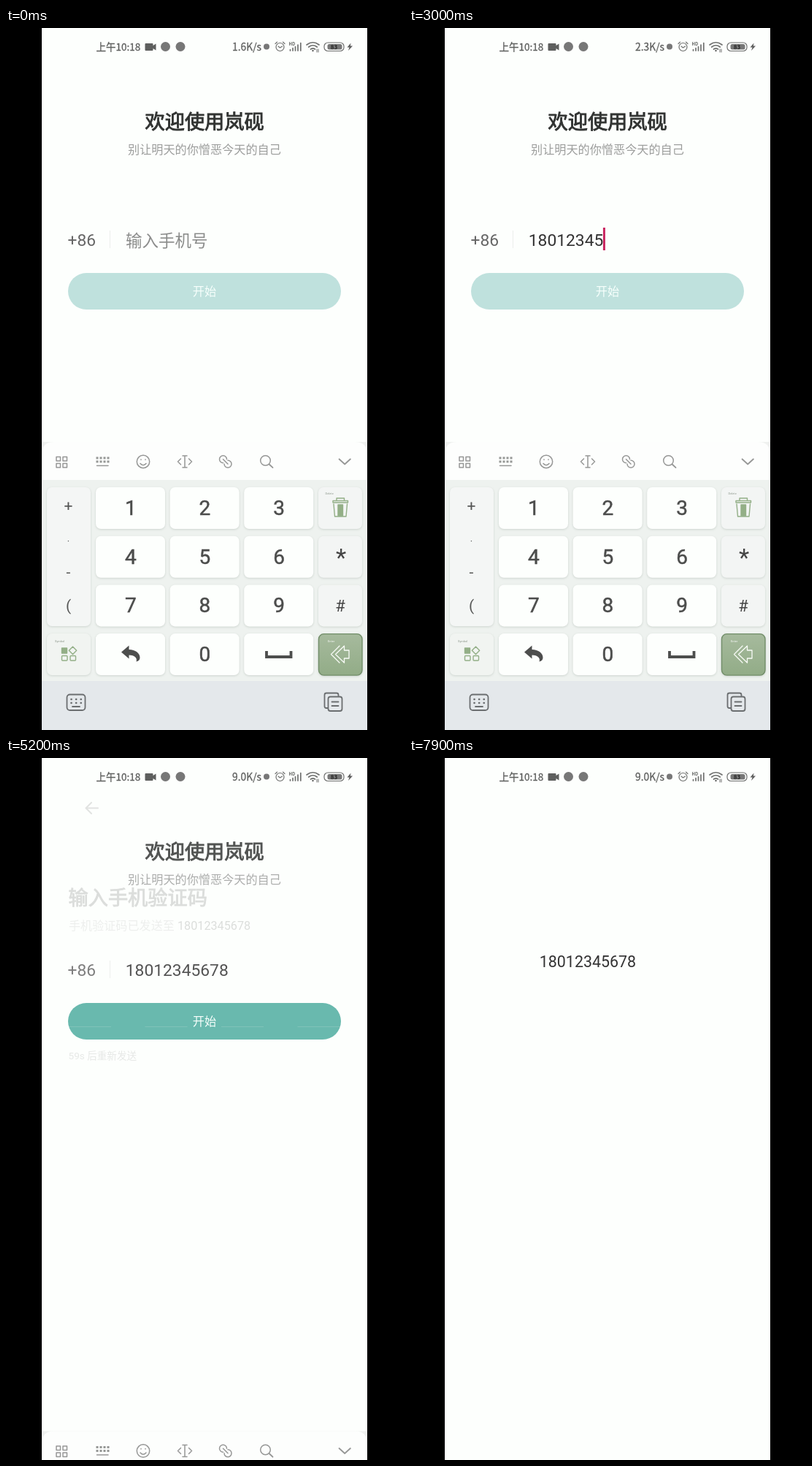
An HTML page for the animation above (8000 ms loop, 544 by 960 pixels).

```html
<!DOCTYPE html>
<html lang="zh-CN">
<head>
<meta charset="utf-8">
<title>Phone sign-in</title>
<style>
html, body { margin: 0; width: 100%; height: 100%; overflow: hidden; background: #000; }
svg { display: block; width: 544px; height: 960px; }
text { font-family: "Noto Sans CJK SC", "Noto Sans CJK", "Noto Sans", sans-serif; white-space: pre; }
.num { font-family: Roboto, "Noto Sans CJK SC", sans-serif; }
.bold { fill: #303231; stroke: #303231; stroke-width: .9; }
.semi { stroke: #5e5f5e; stroke-width: .3; }
.cap { fill: #4c4d4c; stroke: #4c4d4c; stroke-width: .5; }
.mid { text-anchor: middle; }
.line { fill: none; stroke-linecap: round; stroke-linejoin: round; }
.tiny { font: 4px Roboto, sans-serif; }
#keys rect { filter: drop-shadow(0 1.5px 1.5px rgba(90, 110, 95, .22)); }
</style>
</head>
<body>
<svg viewBox="0 0 544 960">
  <defs>
    <clipPath id="screen"><rect x="49" width="446" height="960"/></clipPath>
    <linearGradient id="enter" x1="0" y1="0" x2="0" y2="1">
      <stop offset="0" stop-color="#a6ba9d"/><stop offset="1" stop-color="#92ac87"/>
    </linearGradient>
  </defs>
  <rect width="544" height="960"/>
  <g clip-path="url(#screen)">
    <rect x="49" width="446" height="960" fill="#fdfffd"/>

    <g id="login">
      <text class="bold" x="190.5" y="138" font-size="27.2">欢迎使用岚砚</text>
      <text x="167" y="172" font-size="16.15" fill="#9c9d9c">别让明天的你憎恶今天的自己</text>
      <text class="num" x="84.5" y="298" font-size="22.8" fill="#666">+86</text>
      <path d="M142.5 277v24" stroke="#eceeec"/>
      <text id="hint" x="164" y="298.5" font-size="22.5" fill="#8b8c8b">输入手机号</text>
      <text id="phone" class="num" x="163.8" y="298" font-size="22.8" fill="#333"></text>
      <rect id="caret" y="273" width="3" height="31" fill="#c9245f"/>
      <rect id="button" x="85" y="335" width="374" height="50" rx="25"/>
      <text class="mid" x="272" y="366.3" font-size="16.2" fill="#f7fffc">开始</text>
    </g>

    <g id="verify">
      <path class="line" d="M126 68.500H110M117 61l-7.500 7.500 7.500 7.500" stroke="#555" stroke-width="2"/>
      <text class="bold" x="85.5" y="201" font-size="27.2">输入手机验证码</text>
      <text x="86" y="235" font-size="16.1" fill="#9c9d9c">手机验证码已发送至</text>
      <text class="num full" x="235" y="235" font-size="16.2" fill="#333"></text>
      <path d="M86 367.500h58M190.500 367.500h58M295 367.500h58M399.500 367.500h59" stroke="#f1f3f1"/>
      <rect id="codeCaret" x="114" y="326" width="3" height="27" fill="#c9245f"/>
      <text id="wait" class="num" x="85.5" y="412" font-size="13.6" fill="#737473"></text>
    </g>

    <g id="home">
      <text class="num full" x="178.8" y="285.5" font-size="21.4" fill="#333"></text>
    </g>

    <g id="status" fill="#5e5f5e">
      <text class="semi" x="123.5" y="31" font-size="13.5">上午10:18</text>
      <path d="M191.500 21h9q1 0 1 1v2l4-2.500v9l-4-2.500v2q0 1-1 1h-9q-1 0-1-1v-8q0-1 1-1z"/>
      <circle cx="218.500" cy="25.500" r="6.500" fill="#777"/>
      <circle cx="239" cy="25.500" r="6.500" fill="#777"/>
      <text id="speed" class="semi" x="350" y="30.500" font-size="13.8" text-anchor="end"></text>
      <circle cx="357" cy="25.500" r="4" fill="#777"/>
      <g class="line" stroke="#707170" stroke-width="1.200">
        <circle cx="375.500" cy="26" r="5.500"/>
        <path d="M373 25l2.500 2 3-2M369 21.500l2.500-2.300M382 21.500l-2.500-2.300"/>
        <path d="M389.500 31v-1.500M393 31v-3.500M396.500 31v-5.500M400 31v-8M403.800 31v-10.500" stroke-width="1.700"/>
        <path d="M412 23q8.500-6.500 17 0M414.700 26q5.800-4.500 11.600 0M417.500 29q3-2.300 6 0" stroke-width="1.700"/>
        <path d="M426 29v4M428 29v4" stroke-width="1"/>
        <rect x="436" y="20" width="27" height="11.500" rx="5"/>
      </g>
      <circle cx="420.500" cy="31" r="1.200"/>
      <text x="387.500" y="24" font-size="5.800" font-weight="700">HD</text>
      <rect x="440.500" y="22" width="20" height="7.500" rx="2.500" fill="#777"/>
      <text class="mid" x="449.500" y="29" font-size="8" font-weight="700" fill="#222">83</text>
      <path d="M472.500 20.500l-5 6h3l-1.500 4.500 6-6.500h-3.200z"/>
    </g>

    <g id="keyboard">
      <rect x="49" y="566" width="446" height="52" fill="#eff1ef"/>
      <path d="M49 618v-35q0-17 17-17h412q17 0 17 17v35z" fill="#fdfefd"/>
      <rect x="49" y="618" width="446" height="275" fill="#eef2ef"/>
      <rect x="49" y="893" width="446" height="67" fill="#e4e8eb"/>
      <g class="line" stroke="#969796" stroke-width="1.500">
        <path d="M69 586.500h5.500v5.500h-5.500zM78 586.500h5.500v5.500h-5.500zM69 595.500h5.500v5.500h-5.500zM78 595.500h5.500v5.500h-5.500z"/>
        <path d="M123.500 588h18M123.500 593h18" stroke-width="3" stroke-linecap="butt" stroke-dasharray="3 2"/>
        <path d="M124.500 598.500h15.500"/>
        <circle cx="188" cy="593" r="8.700"/>
        <path d="M184 595.500q4 4.500 8 0M185 590v.5M191 590v.5M242 585h6M245 585v16M242 601h6M239.500 589l-4 4 4 4M250.500 589l4 4-4 4"/>
        <path d="M302.500 589.700a5 5 0 1 0-5 5M299 596.300a5 5 0 1 0 5-5M297.500 589.700l6.500 6.600"/>
        <circle cx="355.500" cy="591.500" r="6.800"/>
        <path d="M360.500 596.500l5 4.700M456.500 589.500l7.700 7 7.700-7" stroke-width="1.800"/>
      </g>
      <g id="keys"></g>
      <g id="side" class="mid" fill="#565756"></g>
      <g id="marks">
        <g fill="#8d978c">
          <text class="tiny" x="437.500" y="637.500">Delete</text>
          <text class="tiny" x="67" y="839.500">Symbol</text>
          <text class="tiny" x="441" y="840" fill="#fff">Enter</text>
        </g>
        <g class="line" stroke="#93af87" stroke-width="1.400">
          <path d="M448 649v-2.500h20.500v2.500zM453 646v-3h10.500v3M449 651l1.500 17h15.500l1.500-17"/>
          <path d="M455 652h6.500v15h-6.500z" fill="#93af87"/>
          <path d="M76.500 848h7v7h-7z" fill="#93af87"/>
          <path d="M91.500 846l5.200 5.300-5.200 5.300-5.200-5.300z"/>
          <rect x="76.500" y="858.500" width="7.500" height="6.500" rx="1"/>
          <rect x="88" y="858.500" width="7.500" height="6.500" rx="1"/>
        </g>
        <path d="M158 853.500l10.500-9v5.500c9 0 15 5 15 11 0 3-2 5-5 5.500 2-6-4-9-10-9v5z" fill="#4d4e4d"/>
        <path d="M357 852v8h33.500v-8" fill="none" stroke="#4d4e4d" stroke-width="3.800"/>
        <path class="line" d="M457 845l-11.500 11.500 11.500 11.500M463.500 845l-12 11.500 12 11.500v-6h6.500v-11h-6.500z" stroke="#f8fbf6" stroke-width="1.300"/>
        <text class="num mid" x="459" y="736" font-size="33" fill="#444">*</text>
        <text class="num mid" x="458" y="798" font-size="22" fill="#444">#</text>
        <g class="line" stroke="#6b6e70" stroke-width="1.800">
          <rect x="83.500" y="911.500" width="25" height="21.500" rx="4"/>
          <path d="M89.500 918h14M89.500 923h14" stroke-dasharray=".1 6.500" stroke-width="2.600"/>
          <path d="M91 928h10M441 930h-2q-2.500 0-2.500-2.500v-15.500q0-2.500 2.500-2.500h14q2.500 0 2.500 2.500v2"/>
          <rect x="441.500" y="914.500" width="19" height="19.500" rx="3"/>
          <path d="M446.500 921.500h9M446.500 927h9"/>
        </g>
      </g>
    </g>
  </g>
</svg>
<script>
const LOOP = 8000;
const NUMBER = "18012345678";
const KEY_DOWN = [1150, 1560, 1820, 2030, 2230, 2500, 2690, 2860, 3020, 3170, 4100];
const HOLD = 120;
const DIGIT_WIDTH = 12.8;

const $ = id => document.getElementById(id);
const set = (node, attrs) => { for (const k in attrs) node.setAttribute(k, attrs[k]); return node; };
const add = (parent, tag, attrs, text = "") => {
  const node = set(document.createElementNS("http://www.w3.org/2000/svg", tag), attrs);
  node.textContent = text;
  return parent.appendChild(node);
};
const show = (node, on) => node.setAttribute("visibility", on ? "visible" : "hidden");
const ramp = (t, from, to) => Math.min(1, Math.max(0, (t - from) / (to - from)));
const ease = p => p * p * (3 - 2 * p);

const key = (x, y, width, height, fill, stroke = "none") =>
  add($("keys"), "rect", { x, y, width, height, rx: 7, fill, stroke, "stroke-width": 1.4 });

const rowY = r => 628 + r * 66.7;
const digitKeys = {};
const faces = ["123", "456", "789", "<0_"];
faces.forEach((row, r) => [...row].forEach((face, c) => {
  const x = 123 + c * 101.6;
  const cap = key(x, rowY(r), 95, 57, "#fdfffd");
  if (face < "0" || face > "9") return;
  digitKeys[face] = cap;
  add($("keys"), "text", { x: x + 47.8, y: rowY(r) + 38, class: "num mid cap", "font-size": 28 }, face);
}));
key(56, 628, 60, 190, "#f4f6f5");
key(56, rowY(3), 60, 57, "#f1f4f1");
for (let r = 0; r < 3; r++) key(428, rowY(r), 60, 57, "#f3f5f4");
key(428.5, rowY(3) + .5, 59.5, 56.5, "url(#enter)", "#728e69");

const sideMarks = [0, 1, 2, 3].map(i => add($("side"), "text", { x: 85.5, y: 660 + i * 45.6, class: "num" }));
document.querySelectorAll(".full").forEach(n => n.textContent = NUMBER);

function draw(t) {
  const typed = KEY_DOWN.filter(d => t >= d + HOLD).length;
  const pressed = KEY_DOWN.findIndex(d => t >= d && t < d + HOLD);

  // Each keystroke restarts the caret blink.
  const blinkStart = typed ? KEY_DOWN[typed - 1] + HOLD : 400;
  const caretOn = t >= blinkStart && t < 5000 && (t - blinkStart) % 1000 < 500;
  $("phone").textContent = NUMBER.slice(0, typed);
  show($("hint"), !typed);
  show($("caret"), caretOn);
  set($("caret"), { x: 163.5 + DIGIT_WIDTH * typed });
  set($("button"), { fill: typed === NUMBER.length ? "#4dac9f" : "#bfe1dd" });
  for (const d in digitKeys) set(digitKeys[d], { fill: NUMBER[pressed] === d ? "#d3d5d3" : "#fdfffd" });

  const toVerify = ease(ramp(t, 5100, 5500));
  const toHome = ease(ramp(t, 7500, 7880));
  set($("login"), { opacity: 1 - toVerify });
  set($("verify"), { opacity: toVerify * (1 - toHome) });
  set($("home"), { opacity: toHome });

  show($("codeCaret"), (t >= 5810 && t < 6310) || (t >= 6810 && t < 7300));
  $("wait").textContent = 59 - Math.max(0, Math.floor((t - 5600) / 1000)) + "s 后重新发送";
  $("speed").textContent = (t < 1000 ? "1.6" : t < 5000 ? "2.3" : "9.0") + "K/s";

  const hidden = ease(ramp(t, 5000, 5250)) - ease(ramp(t, 5450, 5720)) + ease(ramp(t, 6450, 6750));
  set($("keyboard"), { transform: `translate(0 ${394 * hidden})` });
  const marks = t < 5300 ? "+·-(" : "·/+-";
  sideMarks.forEach((n, i) => {
    n.textContent = marks[i];
    set(n, { "font-size": marks[i] === "·" ? 13 : 21 });
  });
}

function frame() {
  draw(performance.now() % LOOP);
  requestAnimationFrame(frame);
}
frame();
</script>
</body>
</html>
```
